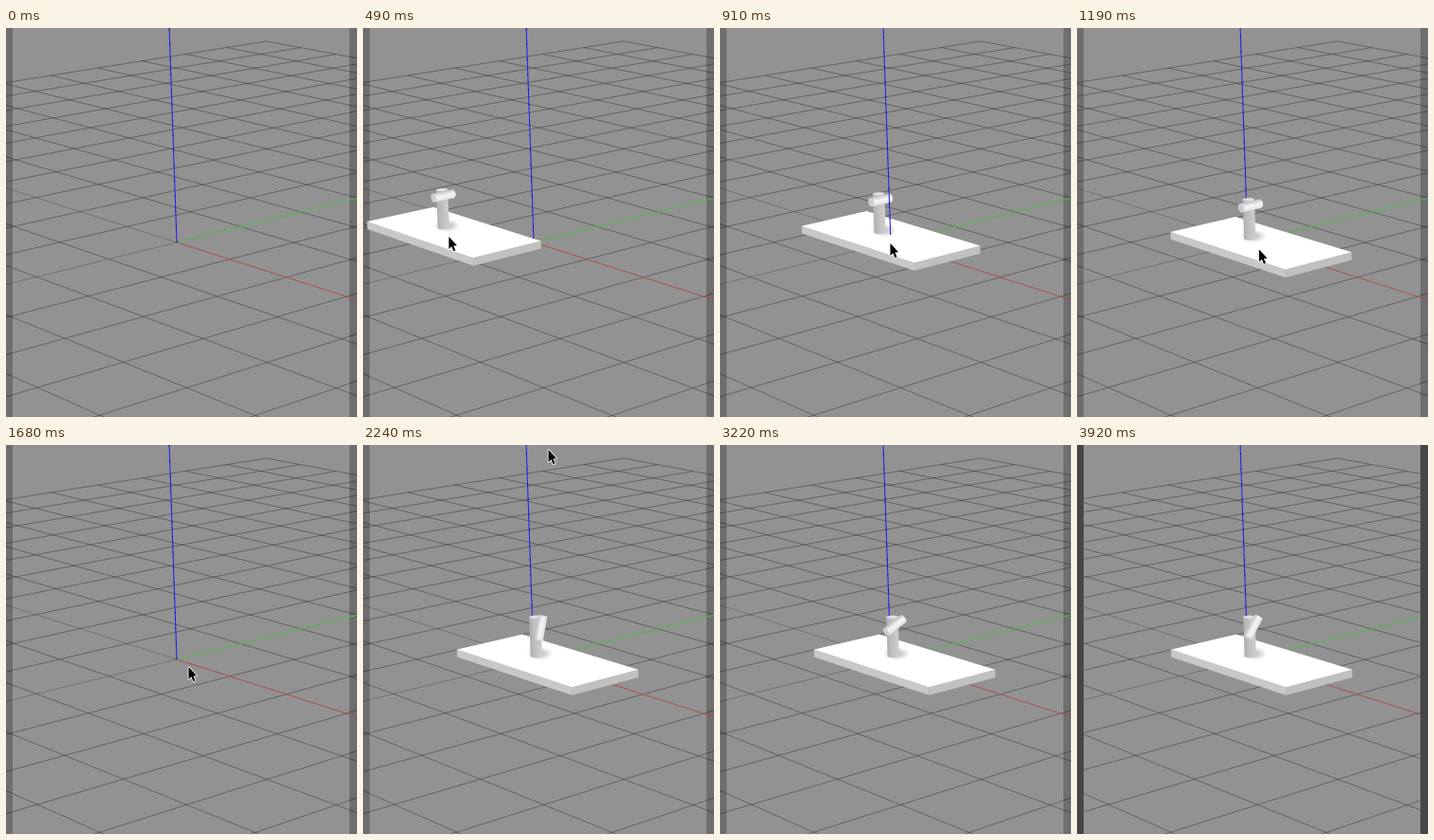
Recreate the animation shown at these times as an HTML page with a canvas. Size 370 by 410 pixels, loop 3.99 s.

```html
<!DOCTYPE html>
<html lang="en">
<head>
<meta charset="utf-8">
<title>Pendulum on a platform</title>
<style>
  html, body { margin: 0; width: 100%; height: 100%; overflow: hidden; background: #929292; }
  canvas { display: block; }
</style>
</head>
<body>
<canvas id="view" width="370" height="410"></canvas>
<script>
const W = 370, H = 410, LOOP = 3990, STEP = 70, LAG = 8;
const ctx = document.getElementById('view').getContext('2d');

// Camera: world metres to screen pixels
const cam = { a: 48.5, b: 74.9, g: -0.031, h: 0.0307, k: -0.0125, horizon: -329.7, drop: 555.7 };

function project([x, y, z]) {
  const ground = 1 + cam.g * x + cam.h * y;
  const w = ground + cam.k * z;
  return [
    (180 + cam.a * x + cam.b * y - 5.2 * z) / w,
    (cam.drop + cam.horizon * ground - 86.9 * z) / w
  ];
}

function groundAt([u, v]) {
  const w = cam.drop / (v - cam.horizon);
  const p = w - 1, q = u * w - 180;
  const det = cam.g * cam.b - cam.h * cam.a;
  return [(p * cam.b - cam.h * q) / det, (cam.g * q - cam.a * p) / det];
}

// Pointer path: time, x, y
const dragIn = [
  [210, 345, 322], [280, 262, 300], [350, 185, 268], [420, 122, 238], [490, 91, 220],
  [560, 106, 219], [630, 130, 223], [700, 139, 223], [840, 168, 226], [910, 180, 227],
  [980, 186, 230], [1050, 190, 232], [1120, 192, 233], [1260, 193, 234]
];
const leave = [[1960, 193, 234], [2030, 194, 190], [2170, 196, 62], [2240, 196, 5], [2310, 197, -30]];

function along(path, t) {
  if (t <= path[0][0]) return path[0].slice(1);
  for (let i = 1; i < path.length; i++) {
    const [t0, x0, y0] = path[i - 1], [t1, x1, y1] = path[i];
    if (t <= t1) {
      const f = (t - t0) / (t1 - t0);
      return [x0 + (x1 - x0) * f, y0 + (y1 - y0) * f];
    }
  }
  return path[path.length - 1].slice(1);
}

// Damped swing once the model has been dropped
function armAngle(t) {
  if (t < 1680) return 0;
  const size = 82 * Math.exp((2240 - t) / 4500);
  return (90 - size * Math.cos((t - 1613) / 805 * 2 * Math.PI)) * Math.PI / 180;
}

function shape(points, fill) {
  ctx.beginPath();
  points.forEach(p => ctx.lineTo(p[0], p[1]));
  ctx.closePath();
  ctx.fillStyle = fill;
  ctx.fill();
}

function line(from, to, color, width = 1) {
  ctx.beginPath();
  ctx.moveTo(...project(from));
  ctx.lineTo(...project(to));
  ctx.strokeStyle = color;
  ctx.lineWidth = width;
  ctx.stroke();
}

function hull(points) {
  const pts = points.slice().sort((p, q) => p[0] - q[0] || p[1] - q[1]);
  const half = list => {
    const out = [];
    for (const p of list) {
      while (out.length > 1) {
        const [a, b] = out.slice(-2);
        if ((b[0] - a[0]) * (p[1] - a[1]) - (b[1] - a[1]) * (p[0] - a[0]) > 0) break;
        out.pop();
      }
      out.push(p);
    }
    return out.slice(0, -1);
  };
  return half(pts).concat(half(pts.reverse()));
}

function ring(c, r, n) {
  return Array.from({ length: 24 }, (_, i) => {
    const s = i * Math.PI / 12, x = r * Math.cos(s), m = r * Math.sin(s);
    return project([c[0] + x, c[1] + n[0] * m, c[2] + n[1] * m]);
  });
}

// Cylinder whose axis lies in the y-z plane
function cylinder(from, to, r, colors, capColor) {
  const dy = to[1] - from[1], dz = to[2] - from[2], len = Math.hypot(dy, dz);
  const n = [-dz / len, dy / len];
  const ends = [ring(from, r, n), ring(to, r, n)];
  const [ax, ay] = project(from), [bx, by] = project(to);
  const size = Math.hypot(bx - ax, by - ay);
  const px = (by - ay) / size * r * 85, py = -(bx - ax) / size * r * 85;
  const grad = ctx.createLinearGradient(ax + px, ay + py, ax - px, ay - py);
  colors.forEach((c, i) => grad.addColorStop(i / (colors.length - 1), c));
  shape(hull(ends.flat()), grad);
  shape(ends[-0.66 * dy + 0.31 * dz > 0 ? 1 : 0], capColor);
}

function grid() {
  for (let i = -10; i <= 10; i++) {
    const color = i ? 'rgba(50,50,50,.56)' : 'rgba(60,60,60,.42)';
    line([i, -10, 0], [i, 10, 0], color, 0.85);
    line([-10, i, 0], [10, i, 0], color, 0.85);
  }
}

function bars(color) {
  ctx.fillStyle = color;
  ctx.fillRect(0, 0, 7, H);
  ctx.fillRect(362, 0, 8, H);
}

function upAxis(base) {
  line([0, 0, base], [0, 0, 3.2], '#1a1aff');
  ctx.setLineDash([2, 14]);
  line([0, 0, base], [0, 0, 3.2], 'rgba(0,0,40,.5)');
  ctx.setLineDash([]);
}

function platform(mx, my) {
  const box = z => [[-1, -1], [-1, 1], [1, 1], [1, -1]]
    .map(([i, j]) => project([mx + i * 1.1, my + j * 0.495, z]));
  const low = box(0), top = box(0.095);
  shape([top[0], top[3], low[3], low[0]], '#c8c8c8');
  shape([top[3], top[2], low[2], low[3]], '#c0c0c0');
  shape(top, '#ffffff');

  const [sx, sy] = project([mx - 0.18, my + 0.05, 0.095]);
  ctx.save();
  ctx.translate(sx, sy - 2);
  ctx.scale(1, 0.5);
  const soft = ctx.createRadialGradient(0, 0, 4, 0, 0, 14);
  soft.addColorStop(0, 'rgba(0,0,0,.22)');
  soft.addColorStop(1, 'rgba(0,0,0,0)');
  ctx.fillStyle = soft;
  ctx.fillRect(-15, -15, 30, 30);
  ctx.restore();
}

function pendulum(mx, my, angle) {
  const x = mx - 0.18;
  cylinder([x, my, 0.1], [x, my, 0.58], 0.07, ['#b0b0b0', '#c2c2c2', '#cecece'], '#dedede');
  const at = d => [mx - 0.055, my + d * Math.cos(angle), 0.54 + d * Math.sin(angle)];
  cylinder(at(-0.208), at(0.075), 0.053, ['#c4c4c4', '#f6f6f6', '#e2e2e2'], '#cccccc');
}

function pointer([x, y]) {
  const tip = [[0, 0], [0, 13], [2.9, 10.3], [5, 15.2], [7, 14.2], [4.9, 9.4], [8.6, 9.2]];
  ctx.save();
  ctx.translate(x - 0.5, y);
  shape(tip, '#000');
  ctx.strokeStyle = '#fff';
  ctx.lineWidth = 1.6;
  ctx.lineJoin = 'round';
  ctx.stroke();
  shape(tip, '#000');
  ctx.restore();
}

function draw(t) {
  ctx.fillStyle = '#929292';
  ctx.fillRect(0, 0, W, H);
  grid();
  bars('rgba(0,0,0,.25)');
  line([0, 0, 0], [6, 0, 0], '#be5454', 0.9);
  line([0, 0, 0], [0, 6, 0], '#56ca56', 0.9);

  if (t >= 210 && (t < 1680 || t >= 1960)) {
    const [mx, my] = groundAt(along(dragIn, t - LAG));
    const pierced = Math.abs(mx) < 1.1 && Math.abs(my) < 0.495;
    const postInFront = mx - 0.18 > my;
    if (!pierced) upAxis(0);
    platform(mx, my);
    if (pierced && postInFront) upAxis(0.095);
    pendulum(mx, my, armAngle(t));
    if (pierced && !postInFront) upAxis(0.095);
  } else {
    upAxis(0);
  }

  if (t >= 210 && t < 2310) pointer(along(t < 1960 ? dragIn : leave, t));
  if (t >= 3920) bars('#464646');
}

const start = performance.now();
function tick() {
  const t = (performance.now() - start) % LOOP;
  draw(Math.floor(t / STEP) * STEP);
  requestAnimationFrame(tick);
}
tick();
</script>
</body>
</html>
```
